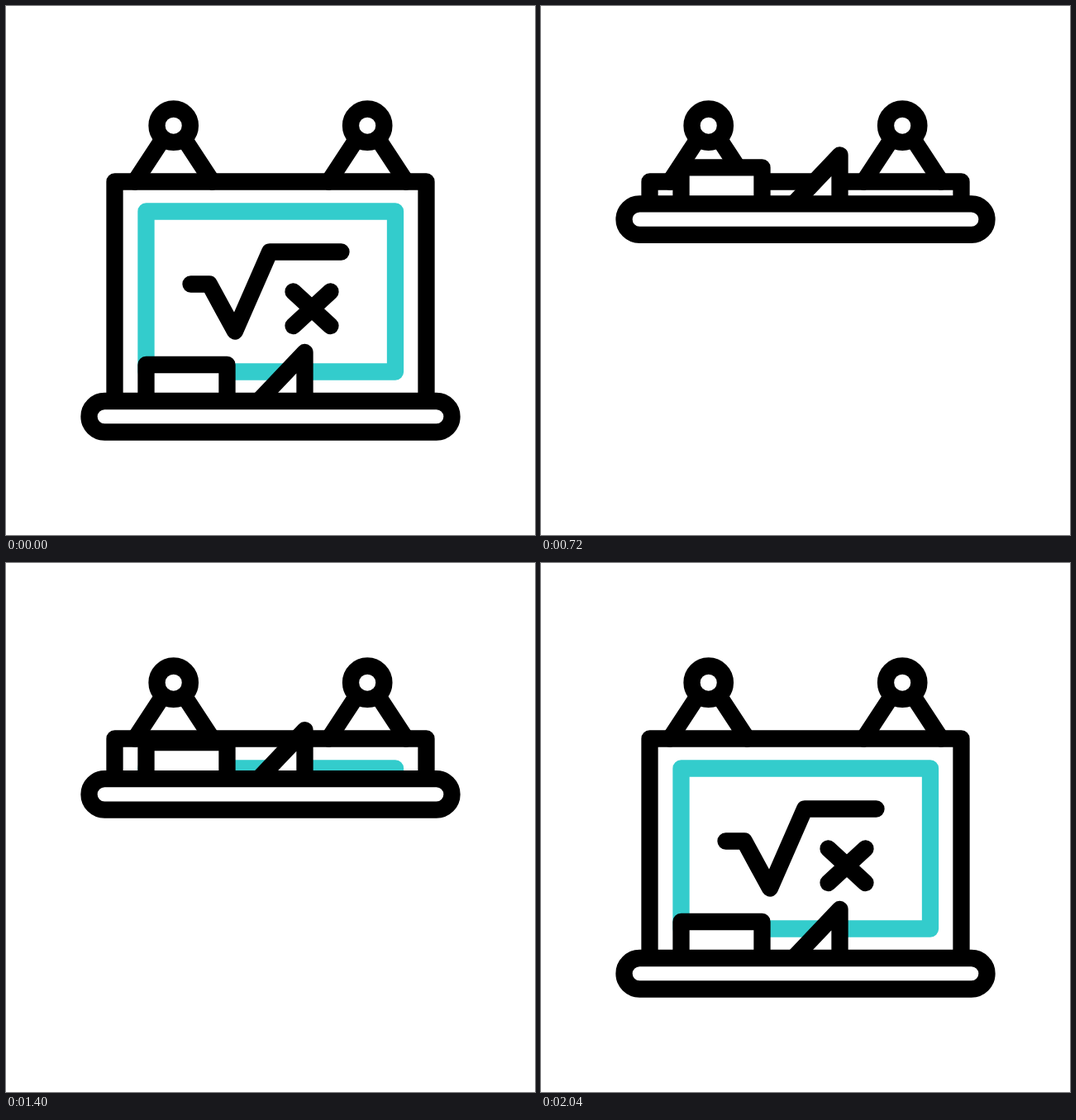
An HTML page for the animation above (2.2 s loop, 640 px wide and 640 px high).

```html
<!DOCTYPE html>
<html lang="en">
<head>
<meta charset="utf-8">
<title>Hanging board</title>
<style>
  html, body { margin: 0; height: 100%; overflow: hidden; background: #fff; }
  svg { display: block; width: 100vw; height: 100vh; }
  g { fill: none; stroke: #000; stroke-width: 20.3; stroke-linecap: round; stroke-linejoin: round; }
  #tray { fill: #fff; }
</style>
</head>
<body>
<svg viewBox="0 0 640 640">
  <defs>
    <clipPath id="aboveTray"><rect id="cover" width="640" height="497"/></clipPath>
    <g id="hook">
      <path d="M-46.8 212.5L-13 161M46.8 212.5L13 161"/>
      <circle cy="144.7" r="20.2" fill="#fff"/>
    </g>
  </defs>
  <g clip-path="url(#aboveTray)">
    <path d="M131.5 478V212.5H508.5V478"/>
    <rect x="169.5" y="248.5" width="301.5" height="194" stroke="#3cc"/>
    <path class="ink" data-anchor="1" pathLength="1" d="M223.5 336.5H246L277 393.5L319 297.5H405.5"/>
    <path class="ink" data-anchor=".5" pathLength="1" d="M347.5 345.5L392.5 387"/>
    <path class="ink" data-anchor=".5" pathLength="1" d="M392.5 345.5L347.5 387"/>
  </g>
  <g>
    <use href="#hook" x="202.7"/>
    <use href="#hook" x="437.2"/>
  </g>
  <g id="tray">
    <path d="M169.5 478V434H267.5V478"/>
    <path d="M305.5 478L361.5 419V478"/>
    <rect x="100.5" y="478" width="439" height="37.5" rx="18.75"/>
  </g>
</svg>
<script>
const LOOP = 2200, UP = 200, DOWN = 1200, MOVE = 800, WRITE = 360, TRAVEL = 256.5;
const tray = document.getElementById('tray');
const cover = document.getElementById('cover');
const inks = document.querySelectorAll('.ink');

// Cubic Bezier easing (.534, 0, .079, 1), solved by bisection
function ease(x) {
  if (x <= 0) return 0;
  if (x >= 1) return 1;
  let lo = 0, hi = 1, s;
  for (let i = 0; i < 24; i++) {
    s = (lo + hi) / 2;
    const u = 1 - s;
    if (3 * u * u * s * .534 + 3 * u * s * s * .079 + s * s * s < x) lo = s;
    else hi = s;
  }
  return s * s * (3 - 2 * s);
}

// Goes 0 to 1 after UP and back to 0 after DOWN
const swing = (t, length) => ease((t - UP) / length) - ease((t - DOWN) / length);

function draw(now) {
  const t = now % LOOP;
  const lift = TRAVEL * swing(t, MOVE);
  tray.setAttribute('transform', `translate(0 ${-lift})`);
  cover.setAttribute('height', 497 - lift);

  const left = 1 - swing(t, WRITE);
  for (const ink of inks) {
    ink.style.visibility = left > .002 ? 'visible' : 'hidden';
    ink.style.strokeDasharray = left < 1 ? `${left} 2` : 'none';
    ink.style.strokeDashoffset = (left - 1) * ink.dataset.anchor;
  }
}

function tick() {
  draw(performance.now());
  requestAnimationFrame(tick);
}
tick();
</script>
</body>
</html>
```
